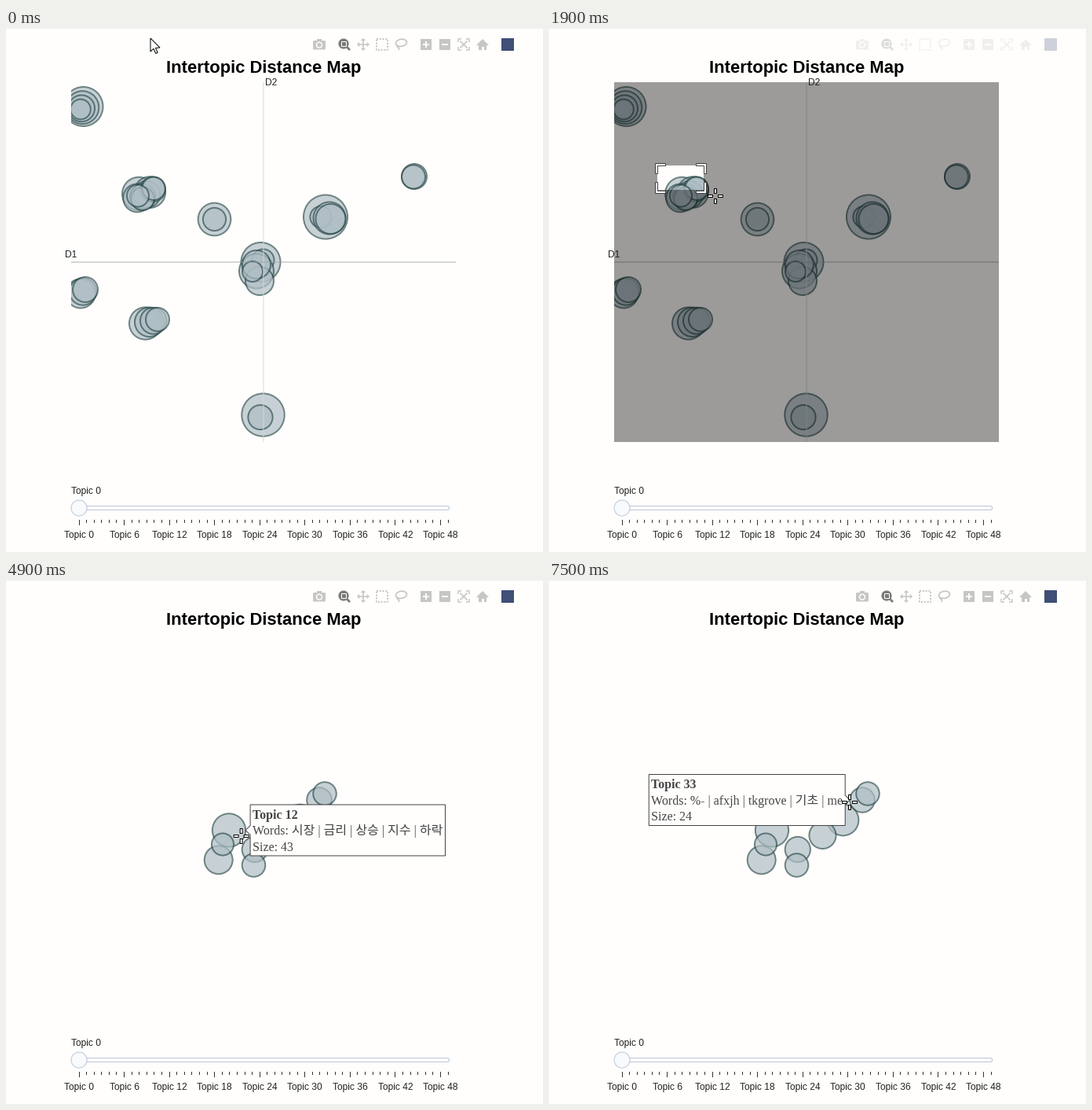
A matplotlib script for the animation above (8 s loop, 684 by 667 pixels).

```python
import math
import numpy as np
import matplotlib.pyplot as plt
from matplotlib.animation import FuncAnimation
from matplotlib.patches import (Circle, Ellipse, FancyBboxPatch, PathPatch,
                                Polygon, Rectangle)
from matplotlib.path import Path

W, H, DPI = 684, 667, 64
PT = 72 / DPI                        # one pixel in points
BG, SLATE, STEEL = "#fffefc", "#2f4f4f", "#b0bec5"
GREY, DARK = "#c6c6c5", "#7c7c7b"
SANS = "Liberation Sans"
SERIF = ["Liberation Serif", "Noto Sans CJK JP"]
L, T, R, B = 83, 69, 573, 527        # plot area
X0, Y0, X1, Y1 = 138, 175, 214, 241  # area that gets zoomed
DRAG_AT, ZOOM_AT = 16, 26            # steps of the drag and of its release

plt.rcParams["toolbar"] = "None"
fig = plt.figure(figsize=(W / DPI, H / DPI), dpi=DPI, facecolor=BG)
ax = fig.add_axes([0, 0, 1, 1])
ax.set_xlim(0, W)
ax.set_ylim(H, 0)
ax.axis("off")
clip = Rectangle((L, B), R - L, T - B, transform=ax.transData)


def add(patch, z=1):
    patch.set_zorder(z)
    return ax.add_patch(patch)


def line(xs, ys, color, width=1.0, z=1, **kw):
    kw.setdefault("solid_capstyle", "butt")
    return ax.plot(xs, ys, color=color, lw=width * PT, zorder=z, **kw)[0]


def box(x, y, w, h, color, z=1):
    return add(Rectangle((x, y), w, h, fc=color, lw=0), z)


def text(x, y, s, size=12, color="#222222", family=SANS, z=6, **kw):
    return ax.text(x, y, s, fontsize=size * PT, color=color, family=family,
                   va="baseline", zorder=z, **kw)


def closed(points):
    points = list(points)
    return Path(points + points[:1], closed=True)


# ---------- topics ----------
# topic: x and y in the zoomed view, size, words
TOPICS = {
    12: (284, 318.5, 43, "시장 | 금리 | 상승 | 지수 | 하락"),
    18: (374.5, 305.5, 38, "매수 | 매도 | 수급 | 기관 | 외인"),
    25: (270.7, 356.3, 31, "차트 | 추세 | 거래 | 종목 | 분석"),
    27: (348.5, 325, 28, "배당 | 수익 | 계좌 | 주식 | 현금"),
    32: (316.8, 343, 25, "실적 | 발표 | 전망 | 매출 | 1분기"),
    33: (399, 280, 24, "%- | afxjh | tkgrove | 기초 | me"),
    38: (315.5, 363, 21, "gn | gx | gh | 57 | 라고"),
    40: (406, 272, 21, "상관 | 환율 | 계수 | 투자 | 달러"),
    44: (276, 336.5, 19, "000 | 마감 | olocaq | 276 | 후회"),
}
# the other clusters: first and last bubble (x, y, radius) and their number
CLUSTERS = [
    ((98.5, 100, 25), (95, 103.5, 12.8), 4),
    ((95, 338, 18.5), (101, 333, 16), 3),
    ((177.5, 376, 20.5), (193, 371, 15), 4),
    ((265.5, 243.5, 20.8), (265.5, 243.5, 14.6), 2),
    ((407, 240.5, 28), (401, 240.5, 13.6), 2),
    ((412, 242, 20.5), (413.5, 243, 19), 2),
    ((520, 189, 16), (519, 189.5, 15), 2),
    ((324.5, 298, 25), (327.5, 295.5, 14), 2),
    ((319, 309.5, 22), (323, 322, 18), 2),
    ((319, 301, 18), (314, 310, 13), 2),
    ((327.5, 492.5, 27.2), (324, 495.5, 15.6), 2),
]


def radius(size):
    return 3.22 * math.sqrt(size)


def to_map(x, y):
    return (X0 + (x - L) * (X1 - X0) / (R - L),
            Y0 + (y - T) * (Y1 - Y0) / (B - T))


def bubble(x, y, r):
    disc = add(Circle((x, y), r - 0.8, fc=STEEL, lw=0, alpha=0.7), 2)
    ring = add(Circle((x, y), r, fill=False, ec=SLATE, lw=2 * PT, alpha=0.7), 2)
    for p in (disc, ring):
        p.set_clip_path(clip)
    return [disc, ring]


overview, zoomed = [], []
for first, last, n in CLUSTERS:
    for spot in np.linspace(first, last, n):
        overview += bubble(*spot)
for x, y, size, _ in TOPICS.values():
    overview += bubble(*to_map(x, y), radius(size))
    zoomed += bubble(x, y, radius(size))
overview += [
    line([328, 328], [T, B], "#cfd8dc", 1.6, 3, alpha=0.6),
    line([L, R], [298, 298], "#9e9e9e", 1.6, 3, alpha=0.5),
    text(75, 292, "D1"),
    text(330, 73, "D2"),
]

# ---------- page, title and slider ----------
box(0, 0, W, 1, "#f1f1f0")
text(328, 57, "Intertopic Distance Map", 22, "black", weight="bold", ha="center")
text(83, 593, "Topic 0")
add(FancyBboxPatch((83.5, 608.5), 481, 5, boxstyle="round,pad=0,rounding_size=2",
                   fc="#f8fafc", ec="#bec8d9", lw=PT))
add(Circle((93, 611), 10, fc="#f8fafc", ec="#bec8d9", lw=PT), 2)
for i, x in enumerate(np.linspace(93, 563, 50)):
    major = i % 6 == 0
    box(math.floor(x), 626, 1, 7 if major else 4, "#333333")
    if major:
        text(x, 649, f"Topic {i}", ha="center")


# ---------- toolbar ----------
def toolbar():
    # camera
    add(FancyBboxPatch((391, 16), 16, 11.5,
                       boxstyle="round,pad=0,rounding_size=1.5", fc=GREY, lw=0))
    box(396, 14, 6, 3, GREY)
    add(Circle((399, 21.6), 4.2, fc=BG, lw=0))
    add(Circle((399, 21.6), 2.7, fc=GREY, lw=0))
    # zoom
    add(Circle((430, 20), 6.6, fc=DARK, lw=0))
    line([433, 438], [23, 28], DARK, 2.8)
    add(Rectangle((427.3, 17.3), 5.4, 5.4, fill=False, ec=BG, lw=PT))
    # pan
    line([448, 462], [21, 21], GREY, 1.6)
    line([455, 455], [14, 28], GREY, 1.6)
    for turn in range(4):
        tip = np.array([8, 4.8 + 3.2j, 4.8 - 3.2j]) * 1j ** turn + 455 + 21j
        add(Polygon(np.column_stack([tip.real, tip.imag]), fc=GREY, lw=0))
    # box select
    line([472, 486, 486, 472, 472], [14, 14, 28, 28, 14], GREY, 2,
         ls=(0, (1, 0.9)), dash_capstyle="butt")
    # lasso
    add(Ellipse((503.5, 18.8), 14, 9, angle=-10, fill=False, ec=GREY, lw=1.7 * PT))
    add(PathPatch(Path([(498, 21.5), (497, 25), (502, 23.5), (500, 28)],
                       [1, 4, 4, 4]), fill=False, ec=GREY, lw=1.7 * PT))
    # zoom in and out
    for x in (528, 552):
        box(x, 14, 14, 14, GREY)
        line([x + 3, x + 11], [21, 21], BG, 2)
    line([535, 535], [17, 25], BG, 2)
    # autoscale
    for sx in (-1, 1):
        line([583 - 4.5 * sx, 583 + 4.5 * sx], [16.5, 25.5], GREY, 1.6)
        for sy in (-1, 1):
            line(583 + sx * np.array([3, 7.2, 7.2]),
                 21 + sy * np.array([7.2, 7.2, 3]), GREY, 1.5)
    # home
    add(Polygon([(599, 22), (607, 14), (615, 22)], fc=GREY, lw=0))
    box(602, 21, 10, 6.5, GREY)
    box(605.5, 24, 3, 3.5, BG)
    box(631, 13, 16, 16, "#3f4f75")


toolbar()
veil = box(386, 8, 266, 26, BG, 2)

# ---------- zoom selection, hover label and pointer ----------
EMPTY = Path(np.zeros((1, 2)))
shade = add(PathPatch(EMPTY, fc="black", lw=0), 4)
corners = add(PathPatch(EMPTY, fc="white", ec="#444444", lw=PT), 5)
tag = add(PathPatch(EMPTY, fc=BG, ec="#444444", lw=PT), 7)
tag_lines = [text(0, 0, "", 16, "#444444", SERIF, 8,
                  weight="bold" if i == 0 else "normal") for i in range(3)]
pointer = add(PathPatch(EMPTY, fc="white", ec="black", lw=PT, snap=False), 10)

ARROW = closed([(0, 0), (0, 17), (4, 13.3), (6.7, 19.4), (9.2, 18.3),
                (6.5, 12.4), (12, 12)])
ARM = np.array([(3.5, -1.5), (9.5, -1.5), (9.5, 1.5), (3.5, 1.5)])
CROSS = Path.make_compound_path(*[
    closed(a) for a in (ARM, -ARM, ARM[:, ::-1], -ARM[:, ::-1])])

# where the pointer rests: arrival, departure, x, y, topic that it calls up
STOPS = [
    (0, 2, 184, 13, None), (8, 8, 149, 205, 25), (10, 10, 170, 221, 38),
    (12, 12, 197, 199, 40), (13, 14, 157, 181, None), (15, 16, 137, 175, None),
    (19, 19, 212, 214, None), (22, 22, 294, 295, None), (24, 26, 214, 241, None),
    (31, 33, 248, 362, None), (35, 35, 256, 368, 25), (38, 40, 268, 336, 44),
    (41, 43, 271, 306, 44), (44, 45, 271, 306, 12), (51, 54, 314, 336, 32),
    (56, 59, 312, 358, 38), (60, 60, 325, 367, 38), (63, 67, 357, 326, 27),
    (69, 73, 380, 311, 18), (75, 79, 383, 283, 33),
]
STOP_TIMES = [t for stop in STOPS for t in stop[:2]]
STOP_XY = np.repeat([stop[2:4] for stop in STOPS], 2, axis=0)


def pointer_at(k):
    return np.array([np.interp(k, STOP_TIMES, c) for c in STOP_XY.T])


def ramp(k, start, length):
    return min(max((k - start) / length, 0), 1)


def show_tag(topic, in_map):
    for a in (tag, *tag_lines):
        a.set_visible(topic is not None)
    if topic is None:
        return
    x, y, size, words = TOPICS[topic]
    if in_map:
        x, y = to_map(x, y)
    rows = (f"Topic {topic}", f"Words: {words}", f"Size: {size}")
    for t, s in zip(tag_lines, rows):
        t.set_text(s)
    width = max(t.get_window_extent().width for t in tag_lines) + 6
    r = radius(size)
    side = 1 if x + r + width < W - 30 else -1
    tip = x + side * r
    near, far = tip + 6 * side, tip + (6 + width) * side
    tag.set_path(closed([(tip, y), (near, y + 6), (near, y + 32.5), (far, y + 32.5),
                         (far, y - 32.5), (near, y - 32.5), (near, y - 6)]))
    for i, t in enumerate(tag_lines):
        t.set_position((min(near, far) + 3, round(y - 15 + 20.6 * i)))


def show_selection(k):
    on = DRAG_AT < k < ZOOM_AT
    shade.set_visible(on)
    corners.set_visible(on)
    if not on:
        return
    x, y = pointer_at(k - 0.6)       # the selection trails the pointer
    shade.set_path(Path.make_compound_path(
        closed([(L, T), (R, T), (R, B), (L, B)]),
        closed([(X0, Y0), (X0, y), (x, y), (x, Y0)])))
    fade = ramp(k, DRAG_AT, 3)
    shade.set_alpha(0.39 * fade)
    corners.set_alpha(fade)
    n = min(x - X0, y - Y0, 20) // 2
    ell = np.array([(-3.5, n), (-0.5, n), (-0.5, -0.5), (n, -0.5), (n, -3.5),
                    (-3.5, -3.5)])
    corners.set_path(Path.make_compound_path(*[
        closed(ell * (sx, sy) + (cx, cy))
        for cx, sx in ((X0, 1), (x, -1)) for cy, sy in ((Y0, 1), (y, -1))]))


def draw(k):
    in_map = k < ZOOM_AT
    for a in overview:
        a.set_visible(in_map)
    for a in zoomed:
        a.set_visible(not in_map)
    veil.set_alpha(ramp(k, DRAG_AT, 4) - ramp(k, ZOOM_AT - 1, 4))
    show_selection(k)
    show_tag([stop[4] for stop in STOPS if stop[0] <= k][-1], in_map)
    spot = pointer_at(k)
    shape = CROSS if spot[1] >= T else ARROW
    pointer.set_path(Path(shape.vertices + spot, shape.codes))
    return []


anim = FuncAnimation(fig, draw, frames=80, interval=100, repeat=True,
                     repeat_delay=0, blit=False)
plt.show()
```
